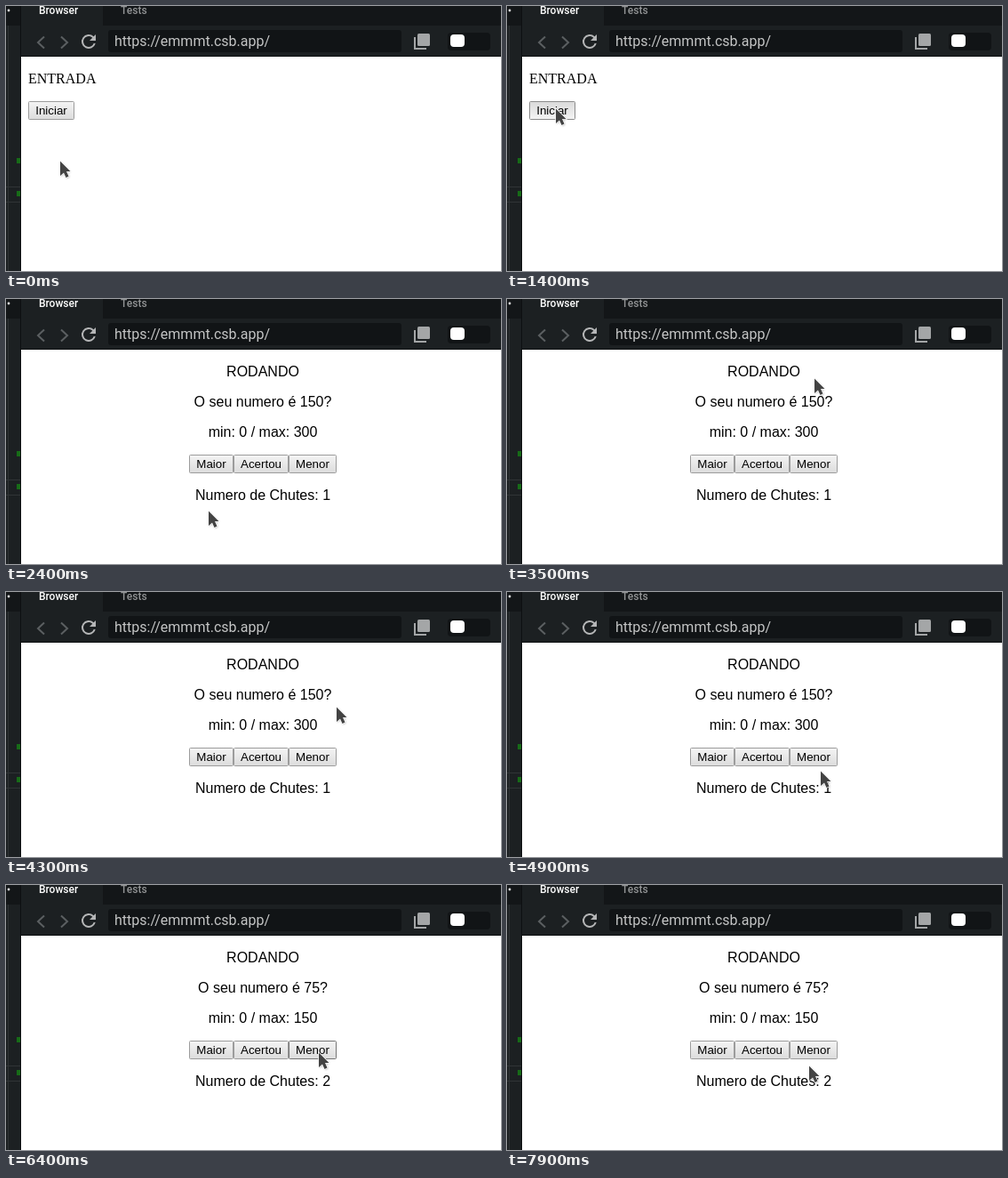
Animation of 557x298 px, one loop 8000 ms. Source, as an HTML page:

```html
<!DOCTYPE html>
<html lang="pt">
<meta charset="utf-8">
<style>
html, body { margin: 0; width: 557px; height: 298px; overflow: hidden; background: #fff }
svg { display: block }
.chrome text { font: 16px Roboto, sans-serif }
.chrome .tab { font: 500 12px Roboto, sans-serif }
.page text { font: 16px "Liberation Sans", Arial, sans-serif; text-anchor: middle }
.page .serif { font-family: "Liberation Serif", Times, serif; text-anchor: start }
.page .btn text { font-size: 13.333px }
.btn rect { fill: url(#up); stroke: #9c9c9c }
.btn.hover rect { stroke: #747474 }
.btn.down rect { fill: url(#down); stroke: #8c8c8c }
</style>
<svg width="557" height="298" viewBox="0 0 557 298">
  <defs>
    <linearGradient id="up" x2="0" y2="1"><stop stop-color="#f4f4f4"/><stop offset="1" stop-color="#dcdcdc"/></linearGradient>
    <linearGradient id="down" x2="0" y2="1"><stop stop-color="#dadada"/><stop offset="1" stop-color="#f4f4f4"/></linearGradient>
    <filter id="soft" x="-50%" y="-50%" width="200%" height="200%"><feGaussianBlur stdDeviation=".8"/></filter>
  </defs>
  <g class="chrome">
    <path fill="#1c2022" d="M0 0H557V57H17V298H0z"/>
    <path fill="#131618" d="M0 0H17V22H0zM109 0H557V22H109z"/>
    <path fill="#0d1011" d="M16 0h1V298h-1zM17 56H557v1H17z"/>
    <path fill="#303436" d="M2 22h1V298H2zM0 203H16v1H0zM0 220H16v1H0z"/>
    <path fill="#176b17" d="M12 171h4v6h-4zM12 208h4v6h-4z"/>
    <circle cx="3" cy="5" r="1.4" fill="#ddd"/>
    <text class="tab" x="37" y="9" fill="#fff">Browser</text>
    <text class="tab" x="129" y="9" fill="#929495">Tests</text>
    <rect x="115" y="27" width="330" height="25" rx="3" fill="#111416"/>
    <text x="122" y="45" fill="#c4c5c5">https://emmmt.csb.app/</text>
    <path d="M43 34.5L36 41l7 6.5M62 34.5L69 41l-7 6.5" fill="none" stroke="#5b5f61" stroke-width="2"/>
    <path transform="translate(81 28)" fill="#b5b6b7" d="M17.65 6.35A8 8 0 1 0 19.73 14h-2.08A6 6 0 1 1 12 6c1.66 0 3.14.69 4.22 1.78L13 11h7V4z"/>
    <rect x="463" y="31" width="14" height="14" rx="1.5" fill="#a4a6a7"/>
    <path d="M460 35V48H473" fill="none" stroke="#a4a6a7" stroke-width="2"/>
    <rect x="497" y="30" width="48" height="20" rx="4" fill="#111416"/>
    <rect x="500" y="32" width="16" height="14" rx="4" fill="#fff"/>
  </g>
  <g class="page" id="start">
    <text class="serif" x="25" y="87">ENTRADA</text>
  </g>
  <g class="page" id="game">
    <text x="289" y="87">RODANDO</text>
    <text x="289" y="121" id="guess"></text>
    <text x="289" y="155" id="range"></text>
    <text x="289" y="226" id="tries"></text>
  </g>
  <g id="cursor">
    <path d="M.5 1V18L4.500 14.500L7 20L10.500 18.500L8 13H12z" fill="#000" opacity=".3" filter="url(#soft)"/>
    <path d="M0 .5V17L4 13.500L6.500 19L9.500 17.500L7 12H11.500z" fill="#434343" stroke="#fff" stroke-width="1.400" paint-order="stroke"/>
  </g>
</svg>
<script>
const LOOP = 8000, STEP = 100;
const $ = id => document.getElementById(id);

// Pointer path: time, x, y
const path = [
  [0, 61, 174], [400, 61, 174], [500, 58, 146], [600, 55, 115],
  [1900, 55, 115], [2100, 110, 160], [2300, 211, 229], [2400, 228, 238],
  [2500, 228, 238], [2600, 237, 253], [2800, 237, 253], [3000, 280, 240],
  [3200, 390, 168], [3300, 414, 120], [3400, 386, 83], [3500, 346, 89],
  [3600, 352, 96], [3700, 365, 93], [3900, 365, 93], [4200, 377, 115],
  [4600, 357, 172], [4700, 353, 184], [4800, 353, 187], [4900, 353, 201],
  [5000, 353, 194], [5100, 352, 186], [5200, 352, 186], [5500, 349, 180],
  [5800, 352, 188], [7400, 352, 188], [7700, 345, 206], [7900, 340, 203], [LOOP, 340, 203]
];

function pointer(t) {
  const i = path.findIndex(p => p[0] > t);
  const [t0, x0, y0] = path[i - 1], [t1, x1, y1] = path[i];
  const k = (t - t0) / (t1 - t0);
  return [Math.round(x0 + (x1 - x0) * k), Math.round(y0 + (y1 - y0) * k)];
}

function button(parent, label, x, y, w, pressed, released) {
  const el = document.createElementNS("http://www.w3.org/2000/svg", "g");
  el.innerHTML = `<rect x="${x + .5}" y="${y + .5}" width="${w - 1}" height="20" rx="1"/>
    <text x="${x + w / 2}" y="${y + 15}">${label}</text>`;
  $(parent).append(el);
  return (t, px, py) => {
    const over = px >= x && px < x + w && py >= y && py < y + 21;
    const down = t >= pressed && t < released;
    el.setAttribute("class", "btn" + (down ? " down" : over ? " hover" : ""));
  };
}

const buttons = [
  button("start", "Iniciar", 25, 107, 52, 1400, 1600),
  button("game", "Maior", 206, 175, 50),
  button("game", "Acertou", 256, 175, 62),
  button("game", "Menor", 318, 175, 54, 6300, 6400)
];

function draw(now) {
  const t = Math.floor(now % LOOP / STEP) * STEP;
  const [x, y] = pointer(t);
  const playing = t >= 1600, second = t >= 6400;
  $("start").style.display = playing ? "none" : "";
  $("game").style.display = playing ? "" : "none";
  $("guess").textContent = `O seu numero é ${second ? 75 : 150}?`;
  $("range").textContent = `min: 0 / max: ${second ? 150 : 300}`;
  $("tries").textContent = `Numero de Chutes: ${second ? 2 : 1}`;
  buttons.forEach(update => update(t, x, y));
  $("cursor").setAttribute("transform", `translate(${x} ${y})`);
  requestAnimationFrame(() => draw(performance.now()));
}
draw(performance.now());
</script>
</html>
```
